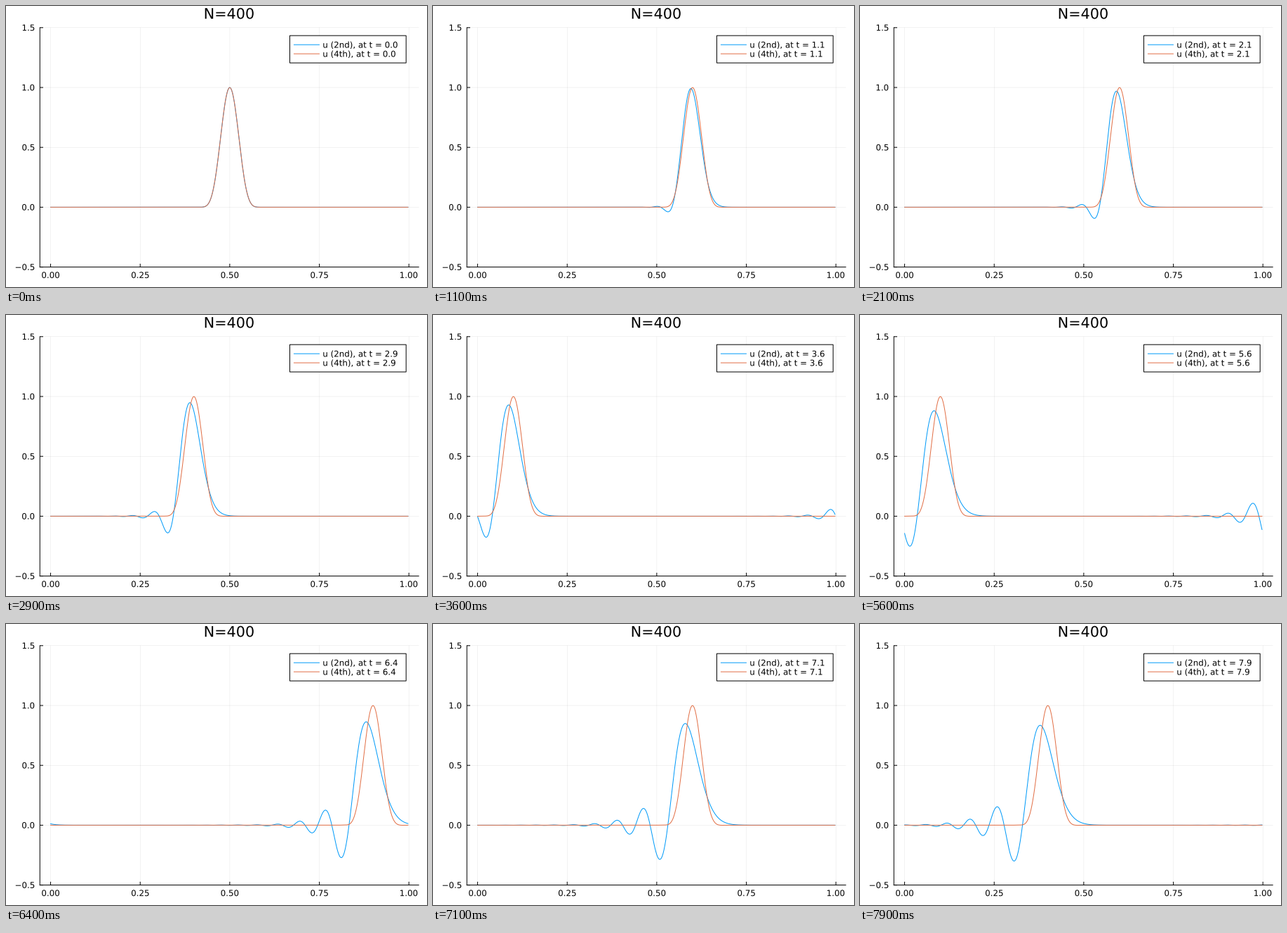
A matplotlib script that plays this animation: 600x400 px, repeating every 8 s.

```python
import numpy as np
import matplotlib.pyplot as plt
from matplotlib.animation import FuncAnimation
from matplotlib.patches import PathPatch, Rectangle
from matplotlib.path import Path
from matplotlib.textpath import TextPath

plt.rcParams["font.family"] = "DejaVu Sans"
plt.rcParams["path.snap"] = False

W, H, DPI = 600, 400, 100
FRAMES, STEP_MS = 80, 100
N = 400
BLUE, ORANGE = "#009af9", "#e26f46"

# Plot area in pixels, y pointing down
LEFT, RIGHT, TOP, BOTTOM = 48.3, 588.2, 30.8, 371.6
TICK, FONT, TITLE = 4.7, 11.85, 20.74

x = np.arange(N) / N
PAD = 0.03 * x[-1]


def pt(pixels):
    return pixels * 72 / DPI


def px(v):
    return LEFT + (RIGHT - LEFT) * (v + PAD) / (x[-1] + 2 * PAD)


def py(u):
    return BOTTOM - (BOTTOM - TOP) * (u + 0.5) / 2


# Advection of a smooth compact bump on a periodic grid
bump = np.clip(1 - ((x - 0.5) / 0.1)**2, 0, None)**8
bump_hat = np.fft.rfft(bump)
theta = 2 * np.pi * np.arange(N // 2 + 1) / N
k2 = N * np.sin(theta)                                # 2nd order stencil
k4 = N * (8 * np.sin(theta) - np.sin(2 * theta)) / 6  # 4th order stencil


def advect(k, t):
    return np.fft.irfft(bump_hat * np.exp(-1j * k * t), N)


fig = plt.figure(figsize=(W / DPI, H / DPI), dpi=DPI, facecolor="white")
ax = fig.add_axes([0, 0, 1, 1])
ax.set_xlim(0, W)
ax.set_ylim(H, 0)
ax.axis("off")


def line(xs, ys, color="black", width=1, **kw):
    return ax.plot(xs, ys, color=color, lw=pt(width), **kw)[0]


def text_path(x0, y0, text, size=FONT, align=0.5):
    """Glyph outlines on baseline y0; align 0, 0.5, 1 is left, centre, right."""
    path = TextPath((0, 0), text, size=size)
    box = path.get_extents()
    shift = x0 - box.x0 - align * box.width
    return Path(path.vertices * [1, -1] + [shift, y0], path.codes)


def label(*args, **kw):
    return ax.add_patch(PathPatch(text_path(*args, **kw), fc="black", lw=0,
                                  zorder=5))


def grid(xs, ys):
    line(xs, ys, width=0.5, alpha=0.1, zorder=1)


for v in np.linspace(0, 1, 5):
    grid([px(v)] * 2, [TOP, BOTTOM])
    line([px(v)] * 2, [BOTTOM, BOTTOM - TICK], solid_capstyle="butt")
    label(px(v), 387.2, f"{v:.2f}")

for v in np.linspace(-0.5, 1.5, 5):
    grid([LEFT, RIGHT], [py(v)] * 2)
    line([LEFT, LEFT + TICK], [py(v)] * 2, solid_capstyle="butt")
    label(40.3, py(v) + 4.32, f"{v:.1f}".replace("-", "\u2212"), align=1)

line([LEFT, LEFT], [TOP, BOTTOM])
line([LEFT, RIGHT], [BOTTOM, BOTTOM])
label((LEFT + RIGHT) / 2, 18.14, f"N={N}", size=TITLE)

curves = []
for k, color in ((k2, BLUE), (k4, ORANGE)):
    curves.append((k, line(px(x), py(bump), color, zorder=3)))

BOX_X, BOX_Y, ROW = 404.45, 42.15, 12.96
ax.add_patch(Rectangle((BOX_X, BOX_Y), 165.75, 3 * ROW, fc="white",
                       ec="black", lw=pt(1), zorder=4))


def entry(row, name, t):
    return text_path(452.3, BOX_Y + row * ROW + 4.32,
                     f"u ({name}), at t = {t:.1f}", align=0)


entries = []
for row, name, color in ((1, "2nd", BLUE), (2, "4th", ORANGE)):
    y0 = BOX_Y + row * ROW
    line([BOX_X + 6, BOX_X + 42], [y0, y0], color, zorder=5)
    patch = PathPatch(entry(row, name, 0), fc="black", lw=0, zorder=5)
    entries.append((row, name, ax.add_patch(patch)))


def update(i):
    t = i * STEP_MS / 1000
    for k, curve in curves:
        curve.set_ydata(py(advect(k, t)))
    for row, name, patch in entries:
        patch.set_path(entry(row, name, t))
    return [c for _, c in curves] + [e[-1] for e in entries]


anim = FuncAnimation(fig, update, frames=FRAMES, interval=STEP_MS,
                     init_func=lambda: update(0), repeat=True, repeat_delay=0)
plt.show()
```
